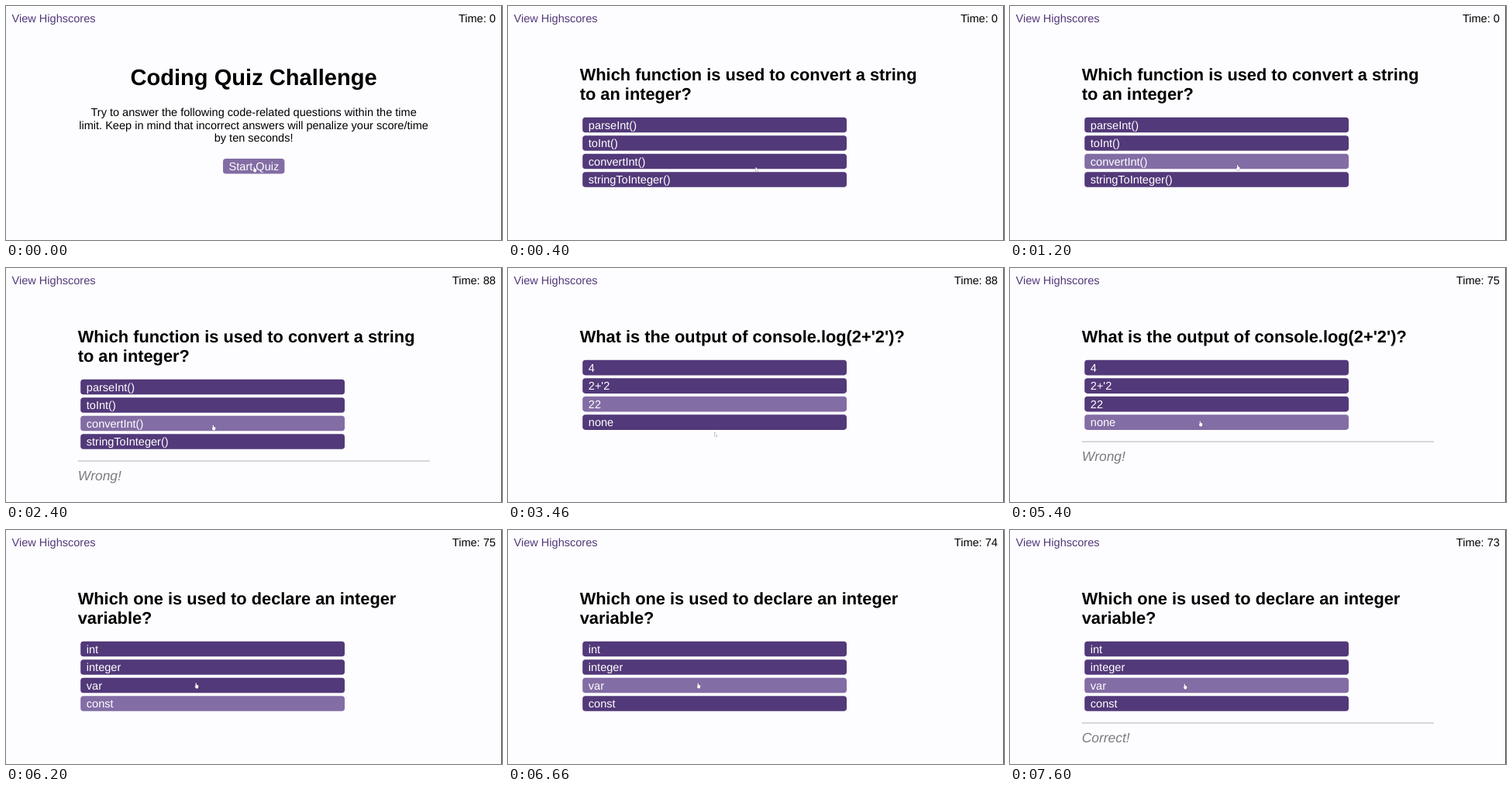
Recreate the animation shown at these times as an HTML page with a canvas. Size 640x302 px, loop 8000 ms.

```html
<!DOCTYPE html>
<html lang="en">
<head>
<meta charset="utf-8">
<title>Coding Quiz</title>
<style>
html, body { margin: 0; width: 100%; height: 100%; overflow: hidden; background: #fdfcfe; }
canvas { display: block; width: 640px; height: 302px; }
</style>
</head>
<body>
<canvas id="stage"></canvas>
<script>
const LOOP = 8000, BEGIN = 400, FEEDBACK_TIME = 1540, LAG = 140;
const EM = 14.54, ROW = 23.5, BUTTON = 19.6, LEFT = 92.7;
const FAMILY = '"Liberation Sans", Arial, sans-serif';
const DARK = '#523979', LIGHT = '#836da5';

const canvas = document.getElementById('stage');
const ctx = canvas.getContext('2d');
const ratio = window.devicePixelRatio || 1;
canvas.width = 640 * ratio;
canvas.height = 302 * ratio;
ctx.scale(ratio, ratio);
ctx.textRendering = 'geometricPrecision';
ctx.lineJoin = 'round';

const intro = [
  'Try to answer the following code-related questions within the time',
  'limit. Keep in mind that incorrect answers will penalize your score/time',
  'by ten seconds!'
];

const questions = [
  { title: ['Which function is used to convert a string', 'to an integer?'],
    answers: ['parseInt()', 'toInt()', 'convertInt()', 'stringToInteger()'],
    pick: 2, answered: 1800, correct: false },
  { title: ["What is the output of console.log(2+'2')?"],
    answers: ['4', "2+'2", '22', 'none'],
    pick: 3, answered: 4660, correct: false },
  { title: ['Which one is used to declare an integer', 'variable?'],
    answers: ['int', 'integer', 'var', 'const'],
    pick: 2, answered: 7600, correct: true }
];

// Each question follows the feedback of the one before and keeps its lit row for a moment.
questions.forEach((q, i) => {
  const last = questions[i - 1];
  q.start = last ? last.answered + FEEDBACK_TIME : BEGIN;
  q.held = last ? last.pick : -1;
});

const moves = [
  { at: 1000, span: 400, x: 268, y: 206 },
  { at: 3330, span: 100, x: 268, y: 215 },
  { at: 3530, span: 530, x: 246, y: 201 },
  { at: 6930, span: 270, x: 226, y: 202 }
];

function pointerAt(t) {
  let x = 321, y = 211;
  for (const m of moves) {
    const u = Math.min(1, Math.max(0, (t - m.at) / m.span));
    const k = u * u * (3 - 2 * u);
    x += (m.x - x) * k;
    y += (m.y - y) * k;
  }
  return { x, y };
}

function secondsAt(t) {
  const ticks = Math.floor((t - BEGIN) / 1000);
  const wrong = questions.filter(q => !q.correct && q.answered <= t).length;
  return ticks < 1 ? 0 : 100 - ticks - 10 * wrong;
}

function text(str, x, y, { scale = 1, style = '', color = '#000', align = 'left' } = {}) {
  ctx.font = `${style} ${EM * scale}px ${FAMILY}`;
  ctx.textAlign = align;
  ctx.fillStyle = color;
  ctx.fillText(str, x, y);
}

function button(label, x, y, w, lit) {
  ctx.fillStyle = lit ? LIGHT : DARK;
  ctx.beginPath();
  ctx.roundRect(x, y, w, BUTTON, 3.8);
  ctx.fill();
  text(label, x + 7.6, y + 14.9, { color: '#fff' });
}

function pointer({ x, y }, hand) {
  ctx.save();
  ctx.translate(x, y);
  ctx.fillStyle = '#fff';
  ctx.strokeStyle = hand ? 'rgba(50,35,80,.6)' : '#8b8792';
  ctx.lineWidth = 0.8;
  const outline = hand
    ? 'M-1.4-3.6H-.2L0-1.2 2.2-.4 2.4 1.6 1.6 3.6H-1L-2.6.8-1.4.6Z'
    : 'M-1.4-3V2.2L-.3 1.4 .5 3.2 1.2 2.8 .5 1H2Z';
  const shape = new Path2D(outline);
  ctx.stroke(shape);
  ctx.fill(shape);
  ctx.restore();
}

function drawIntro() {
  text('Coding Quiz Challenge', 319.6, 102.3, { scale: 2, style: 'bold', align: 'center' });
  intro.forEach((line, i) => text(line, 319.6, 142.2 + i * 16.6, { align: 'center' }));
  button('Start Quiz', 280, 197, 79.4, true);
}

// Returns whether the pointer is over an answer.
function drawQuestion(q, t, y) {
  q.title.forEach((line, i) => text(line, LEFT, 95.5 + i * 25, { scale: 1.5, style: 'bold' }));
  const top = 118.8 + (q.title.length - 1) * 24.9;
  const over = q.answers.findIndex((a, i) => y >= top + i * ROW && y < top + i * ROW + BUTTON);
  const lit = t < q.start + LAG ? q.held : over;
  q.answers.forEach((a, i) => button(a, 96.2, top + i * ROW, 340.8, i === lit));
  if (t >= q.answered) {
    ctx.fillStyle = '#c9c8cc';
    ctx.fillRect(LEFT, top + 104.7, 454.3, 1.4);
    text(q.correct ? 'Correct!' : 'Wrong!', LEFT, top + 130,
      { scale: 1.2, style: 'italic', color: '#7b7a7d' });
  }
  return over >= 0;
}

function draw(t) {
  ctx.fillStyle = '#fdfcfe';
  ctx.fillRect(0, 0, 640, 302);
  ctx.fillStyle = '#4a494c';
  ctx.fillRect(639, 0, 1, 302);

  const q = questions.filter(item => item.start <= t).pop();
  const clock = q && t < q.start + LAG ? q.start : t;
  text('View Highscores', 7.6, 21, { color: DARK });
  text('Time: ' + secondsAt(clock), 631.8, 21, { align: 'right' });

  const at = pointerAt(t);
  let hand = true;
  if (q) hand = drawQuestion(q, t, at.y);
  else drawIntro();
  pointer(at, hand);
}

const begin = performance.now();
function frame() {
  draw((performance.now() - begin) % LOOP);
  requestAnimationFrame(frame);
}
frame();
</script>
</body>
</html>
```
